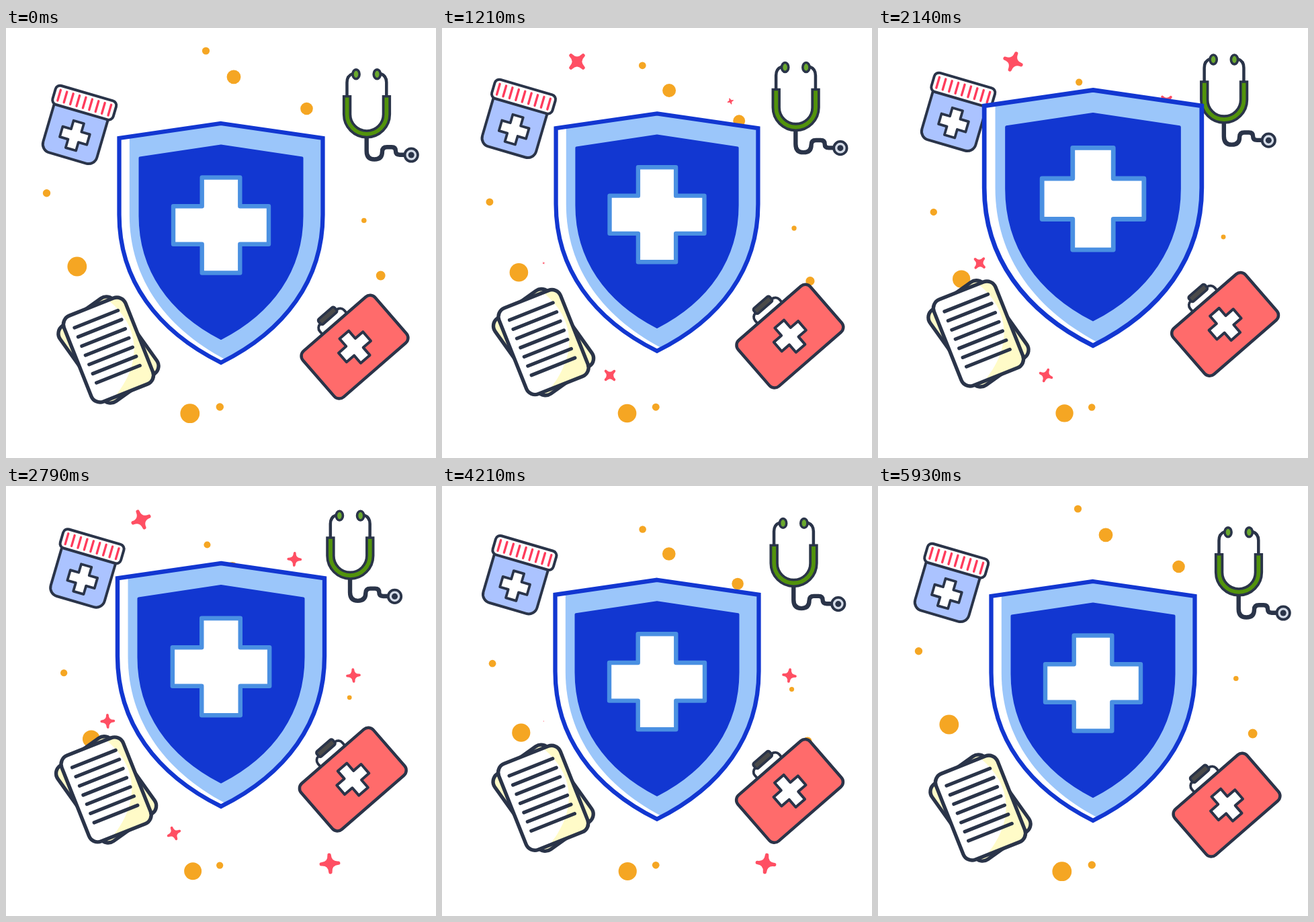
An HTML page with a canvas for the animation above (6 s loop, 640 by 640 pixels).

```html
<!DOCTYPE html>
<html lang="en">
<head>
<meta charset="utf-8">
<title>Health shield</title>
<style>
html, body { margin: 0; width: 100%; height: 100%; overflow: hidden; background: #fff; }
canvas { display: block; width: 640px; height: 640px; }
</style>
</head>
<body>
<canvas id="stage" width="640" height="640"></canvas>
<script>
const ctx = document.getElementById('stage').getContext('2d');
const LOOP = 6000;
const INK = '#2a3449', BLUE = '#1237d1', SKY = '#9bc6fa', ORANGE = '#f5a623', PINK = '#ff4f63';

const clamp = x => Math.max(0, Math.min(1, x));
const smooth = x => { x = clamp(x); return x * x * (3 - 2 * x); };
const swing = (t, peak, end) => t < peak ? smooth(t / peak) : smooth((end - t) / (end - peak));

// Runs fn in a moved, turned and scaled frame
function at(x, y, deg, fn, scale = 1) {
  ctx.save();
  ctx.translate(x, y);
  ctx.rotate(deg * Math.PI / 180);
  ctx.scale(scale, scale);
  fn();
  ctx.restore();
}

function paint(path, fill, stroke, width) {
  if (fill) { ctx.fillStyle = fill; ctx.fill(path); }
  if (stroke) { ctx.strokeStyle = stroke; ctx.lineWidth = width; ctx.stroke(path); }
}

function box(x, y, w, h, r) {
  const p = new Path2D();
  p.roundRect(x, y, w, h, r);
  return p;
}

// Rectangle centred on the frame, w and h are half sizes
const slab = (w, h, r) => box(-w, -h, 2 * w, 2 * h, r);

// Plus sign: half length l, half arm width a
function plus(l, a) {
  const p = new Path2D();
  for (let i = 0; i < 4; i++) {
    const c = Math.round(Math.cos(i * Math.PI / 2)), s = Math.round(Math.sin(i * Math.PI / 2));
    for (const [x, y] of [[a, -a], [l, -a], [l, a]]) p.lineTo(x * c - y * s, x * s + y * c);
  }
  p.closePath();
  return p;
}

// Evenly spaced parallel strokes centred on the frame
function strokes(n, gap, half, upright) {
  const p = new Path2D();
  for (let i = 0; i < n; i++) {
    const k = (i - (n - 1) / 2) * gap;
    for (const e of [-half, half]) {
      const [x, y] = upright ? [k, e] : [e, k];
      if (e < 0) p.moveTo(x, y); else p.lineTo(x, y);
    }
  }
  return p;
}

function oval(x, y, rx, ry = rx) {
  const p = new Path2D();
  p.ellipse(x, y, rx, ry, 0, 0, Math.PI * 2);
  return p;
}

// Dots: x, y, radius; the whole group shrinks towards one point
const dots = [
  [297.5, 34, 5.6], [339, 72.8, 10.4], [447.5, 120, 9.3],
  [60.5, 245.8, 5.7], [105.8, 355, 14.4], [273.8, 573.7, 14.4],
  [318.3, 564, 5.7], [532.8, 286.5, 3.8], [557.7, 368.5, 6.9]
];

function drawDots(t) {
  at(317, 569.5, 0, () => {
    for (const [x, y, r] of dots) paint(oval(x - 317, y - 569.5, r), ORANGE);
  }, 1 - 0.1 * swing(t, 2770, 5940));
}

// Stars: x, y, birth, size; all share one life span and one spin
const BIG = 12.8, SMALL = 9, LIFE = 3120;
const stars = [
  [201, 50, 150, BIG], [250, 517, 150, SMALL], [429.3, 109, 1060, SMALL],
  [151.3, 350, 1130, SMALL], [517, 282, 2420, SMALL], [482, 562, 2420, BIG]
];
const starShape = new Path2D('M1 0Q0 0 0 1Q0 0 -1 0Q0 0 0 -1Q0 0 1 0Z');

function drawStar(t, [x, y, birth, r]) {
  const age = t - birth;
  const size = Math.min(smooth(age / 330), smooth((LIFE - age) / 260));
  if (size <= 0) return;
  at(x, y, -45 + (age - 1060) * 0.0713, () => paint(starShape, PINK, PINK, 0.42), size * r);
}

function drawBottle() {
  at(116.7, 111.2, 16.3, () => {
    paint(box(-42.6, 0, 83.4, 86, [0, 0, 13, 13]), '#abc3ff', INK, 4);
    paint(slab(47, 14.6, 7), '#fff', INK, 4);
    paint(strokes(9, 9.8, 8.2, true), null, '#ff3b5c', 3.4);
    ctx.translate(0, 51);
    paint(plus(21, 8), '#fff', INK, 3.8);
  });
}

const wires = new Path2D('M516 68Q507.5 71 507.5 81V103M557.5 68Q566.3 71 566.3 81V103');
const yoke = new Path2D('M507.6 100V128.5A29.4 29.4 0 0 0 566.4 128.5V100');
const yokeCore = new Path2D('M507.6 103.5V128.5A29.4 29.4 0 0 0 566.4 128.5V103.5');
const hose = new Path2D('M536.7 163V183Q536.7 195.5 548.3 195.5Q560 195.5 560 184Q560 177.3 567 177.3' +
  'H574Q580 177.3 580 183Q580 188.7 586 188.7H594');

function drawStethoscope() {
  paint(wires, null, INK, 4.5);
  for (const x of [521, 552.3]) paint(oval(x, 68.8, 5.1, 6.9), '#6aa82e', INK, 3.6);
  paint(hose, null, INK, 6.4);
  ctx.lineCap = 'butt';
  paint(yoke, null, INK, 13.4);
  paint(yokeCore, null, '#52930c', 5.8);
  ctx.lineCap = 'round';
  paint(oval(603.2, 189, 9.7), '#d5dce8', INK, 3.8);
  paint(oval(603.2, 189, 4.5), INK);
}

const sheet = slab(49.3, 68.8, 14);
const pageLight = new Path2D('M140 396C205 440 207 505 148 564L60 564V396Z');

function drawPapers() {
  at(152.5, 479, -35.5, () => paint(sheet, '#fffbc8', INK, 5.4));
  at(152.5, 479, -21.7, () => {
    paint(sheet, '#fffbc8');
    ctx.save();
    ctx.clip(sheet);
    ctx.rotate(21.7 * Math.PI / 180);
    ctx.translate(-152.5, -479);
    paint(pageLight, '#fff');
    ctx.restore();
    paint(sheet, null, INK, 5.4);
    ctx.translate(0, -5.1);
    paint(strokes(7, 14.72, 34.8), null, INK, 5.2);
  });
}

function drawKit() {
  at(519, 474.7, -41, () => {
    paint(box(-24, -59.5, 48, 25, 8), '#fff', INK, 3.8);
    paint(box(-15.8, -66.5, 31.6, 10, 3), '#4a4a4a', INK, 3.8);
    paint(slab(71.2, 45.4, 10), '#ff6b6b', INK, 4.5);
    paint(plus(24, 9), '#fff', INK, 4);
  });
}

// Symmetric shield outline around the middle of its cross
function crest(w, top, shoulder, side, tip) {
  const h = tip - side, y1 = side + 0.44 * h, y2 = side + 0.785 * h, x2 = 0.63 * w;
  const p = new Path2D();
  p.moveTo(0, top);
  p.lineTo(w, shoulder);
  p.lineTo(w, side);
  p.bezierCurveTo(w, y1, x2, y2, 0, tip);
  p.bezierCurveTo(-x2, y2, -w, y1, -w, side);
  p.lineTo(-w, shoulder);
  p.closePath();
  return p;
}
const shell = crest(151.5, -151.5, -129.5, -15.5, 204.5);
const core = crest(120.5, -118, -100, -14, 168.5);

function drawShield(t) {
  const peak = 2200;
  let lift, grow;
  if (t < peak) {
    const u = t / peak;
    lift = 41 * Math.pow(u, 1.6);
    grow = 0.078 * u * u * (2.9 * u - 1.9);
  } else {
    lift = 41 * Math.pow(clamp((4850 - t) / 2650), 2.05);
    grow = 0.078 * Math.pow(clamp((3300 - t) / 1100), 2);
  }
  at(320, 293.5 - lift, 0, () => {
    paint(shell, '#fff');
    ctx.save();
    ctx.clip(shell);
    ctx.translate(15.3, 0);
    paint(shell, SKY);
    ctx.restore();
    ctx.lineJoin = 'miter';
    paint(shell, null, BLUE, 6.3);
    ctx.lineJoin = 'round';
    paint(core, BLUE, BLUE, 4);
    paint(plus(71, 28.3), '#fff', '#4a90e2', 6.4);
  }, 1 + grow);
}

// Draw call with its shift at the peak
const items = [
  [drawBottle, 11.4, -21.5], [drawStethoscope, -24.7, -24.7],
  [drawPapers, -3.4, -27.2], [drawKit, -2.7, -38.2]
];

function render(t) {
  ctx.fillStyle = '#fff';
  ctx.fillRect(0, 0, 640, 640);
  ctx.lineCap = ctx.lineJoin = 'round';
  drawDots(t);
  for (const star of stars) drawStar(t, star);
  const sway = swing(t, 2715, 5890);
  for (const [draw, dx, dy] of items) at(dx * sway, dy * sway, 0, draw);
  drawShield(t);
}

const start = performance.now();
function tick() {
  render((performance.now() - start) % LOOP);
  requestAnimationFrame(tick);
}
tick();
</script>
</body>
</html>
```
